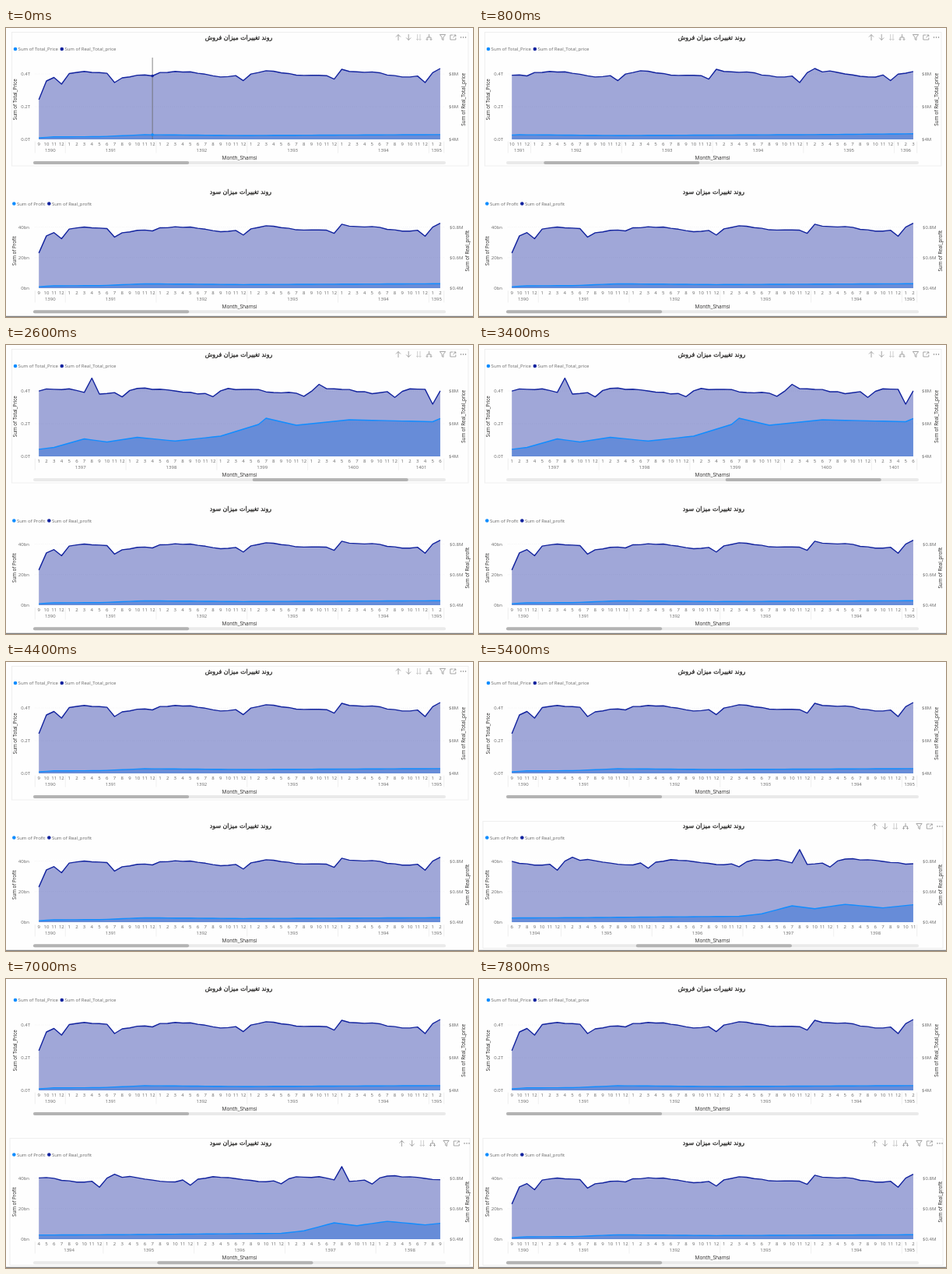
An HTML page for the animation above (8000 ms loop, 600 by 371 pixels).

```html
<!DOCTYPE html>
<html lang="en">
<head>
<meta charset="utf-8">
<title>Scrolling trend charts</title>
<style>
  html, body { margin: 0; width: 100%; height: 100%; overflow: hidden; background: #fefefe; }
  svg { display: block; width: 100%; height: 100%; }
  text { font: 6px "Open Sans", "Noto Sans", sans-serif; fill: #666; }
  .dark { fill: #252423; font-size: 6.2px; }
  .name { font-size: 6.5px; }
  .title { font: 7.9px "DejaVu Sans", sans-serif; fill: #252423; stroke: #252423; stroke-width: .3; direction: rtl; }
  .mid { text-anchor: middle; }
  .end { text-anchor: end; }
  .icon { fill: none; stroke: #909090; stroke-width: .8; }
</style>
</head>
<body>
<svg id="stage" viewBox="0 0 600 371"></svg>
<script>
const LOOP = 8000, VISIBLE = 54, TOTAL = 143, LEFT = 42.2, RIGHT = 557.9;
const STEP = (RIGHT - LEFT) / (VISIBLE - 1);
const TRACK = { x: 35, w: 530 };
const NAVY = '#12239e', BLUE = '#118dff';

// Month 0 is 1390/9.
const monthOf = i => (i + 8) % 12 + 1;
const yearOf = i => 1390 + Math.floor((i + 8) / 12);

// Linear interpolation through [position, value] pairs.
function along(keys, p) {
  const i = keys.findIndex(k => k[0] >= p);
  if (i < 0) return keys[keys.length - 1][1];
  if (i === 0) return keys[0][1];
  const [a, u] = keys[i - 1], [b, v] = keys[i];
  return u + (v - u) * (p - a) / (b - a);
}

function noise(i) {
  const s = Math.sin(i * 12.9898) * 43758.5453;
  return (s - Math.floor(s)) * 2 - 1;
}

// Heights above the base line: a yearly wave that dips in month 12, with a few outliers.
const outliers = { 0: 51, 1: 75, 2: 79.5, 3: 71, 10: 73, 11: 79, 15: 81.5, 40: 90, 51: 73,
  53: 91, 83: 100.5, 113: 92.5, 128: 67, 131: 90, 141: 91, 142: 21 };
function realAt(i) {
  if (i in outliers) return outliers[i];
  const m = monthOf(i);
  return 84 + 3 * Math.cos((m - 3.5) * Math.PI / 6) - (m === 12 ? 6.5 : 0) + 1.3 * noise(i);
}
const priceKeys = [[0, 2], [2, 3.2], [8, 3.5], [14, 6], [27, 5], [54, 6.2], [75, 8],
  [78, 11.5], [82, 22.5], [85, 18.5], [89, 24.5], [94, 19.7], [100, 26], [105, 41], [106, 49],
  [110, 40], [117, 47], [128, 44.5], [135, 74], [137, 91], [138, 85.5], [141, 85.5], [142, 52]];

const indices = Array.from({ length: TOTAL }, (_, i) => i);
const real = indices.map(realAt);
const price = indices.map(i => along(priceKeys, i));

// First visible month over time.
const scrollTop = [[450, 0], [1000, 20], [1300, 20], [1600, 36], [2600, 76],
  [3000, 89], [3250, 89], [4250, 0]];
const scrollLow = [[4900, 0], [5900, 89], [6100, 89], [7000, 43], [7780, 0]];
const SWAP = 4600, CROSS_END = 300;

// Profit is close to a tenth of the price; its share grows slightly over the years.
const share = i => .98 + .017 * Math.min(1, i / 90);

const charts = [
  {
    base: 143, unit: 42, scroll: scrollTop,
    title: 'روند تغییرات میزان فروش', titleX: 299, titleY: 15.2,
    legend: [[12, 'Sum of Total_Price'], [71.8, 'Sum of Real_Total_price']], legendY: 27,
    left: ['0.0T', '0.2T', '0.4T'], leftX: 31, right: ['$4M', '$6M', '$8M'], rightX: 569,
    names: [[14.5, 'Sum of Total_Price'], [590, 'Sum of Real_Total_price']],
    monthY: 150.7, yearY: 158.6, nameY: 169.2, barY: 171,
    frame: [7.5, 5.5, 586.5, 171.5], icons: [504, 12],
    realH: u => u, priceH: u => u
  },
  {
    base: 334, unit: 39.25, scroll: scrollLow,
    title: 'روند تغییرات میزان سود', titleX: 301.5, titleY: 213,
    legend: [[10.3, 'Sum of Profit'], [55.3, 'Sum of Real_profit']], legendY: 225.5,
    left: ['0bn', '20bn', '40bn'], leftX: 30, right: ['$0.4M', '$0.6M', '$0.8M'], rightX: 570,
    names: [[13, 'Sum of Profit'], [595, 'Sum of Real_profit']],
    monthY: 342.2, yearY: 350.4, nameY: 360.2, barY: 362.3,
    frame: [5, 204.5, 591, 163], icons: [508.5, 211],
    realH: (u, i) => ((4 + u / 21) * share(i) - 4) * 78.5 / 4, priceH: u => u * 78.5 / 84
  }
];

const svg = document.getElementById('stage');

function add(parent, tag, attrs, text) {
  const el = document.createElementNS('http://www.w3.org/2000/svg', tag);
  for (const k in attrs) el.setAttribute(k, attrs[k]);
  if (text !== undefined) el.textContent = text;
  return parent.appendChild(el);
}
const write = (parent, x, y, text, cls = '', more = {}) =>
  add(parent, 'text', { x, y, class: cls, ...more }, text);
const show = (el, on) => el.setAttribute('visibility', on ? 'visible' : 'hidden');

function drawIcons(parent, [x, y]) {
  const g = add(parent, 'g', { class: 'icon', transform: `translate(${x} ${y})` });
  const path = (dx, d, more) => add(g, 'path', { d, transform: `translate(${dx} 0)`, ...more });
  path(0, 'M0 4V-3.5M-3 -.5L0 -3.5L3 -.5');
  path(13.2, 'M0 -4V3.5M-3 .5L0 3.5L3 .5');
  path(26.3, 'M-1.7 -4V3.5M-3.2 2L-1.7 3.5L-.2 2M1.7 -4V3.5M.2 2L1.7 3.5L3.2 2', { opacity: .5 });
  path(39.5, 'M0 -4V0M-2.5 3.5V0H2.5V3.5M-3.8 2.2L-2.5 3.5L-1.2 2.2M1.2 2.2L2.5 3.5L3.8 2.2');
  path(57, 'M-3.6 -3.5H3.6L.9 0V3.5L-.9 2.5V0Z');
  path(70.3, 'M0 -3H-3.5V3H3.5V.5M1 -3H3.5V-1M3.5 -3L0 .3');
  for (const dx of [-3, 0, 3])
    add(g, 'circle', { cx: 83.5 + dx, cy: 0, r: .75, fill: '#777', stroke: 'none' });
}

function build(c) {
  const g = add(svg, 'g', {});
  c.hover = add(g, 'g', {});
  const [x, y, width, height] = c.frame;
  add(c.hover, 'rect', { x, y, width, height, fill: 'none', stroke: '#ececec', 'stroke-width': .8 });
  drawIcons(c.hover, c.icons);

  write(g, c.titleX, c.titleY, c.title, 'title mid');
  c.legend.forEach(([lx, label], i) => {
    add(g, 'circle', { cx: lx, cy: c.legendY, r: 2.3, fill: i ? NAVY : BLUE });
    write(g, lx + 3.6, c.legendY + 2.2, label);
  });
  for (let i = 0; i < 3; i++) {
    const ty = c.base - i * c.unit;
    if (i) add(g, 'path', { d: `M37 ${ty}H563`, stroke: '#dcdcdc', 'stroke-width': .5, 'stroke-dasharray': '.6 2' });
    write(g, c.leftX, ty + 2, c.left[i], 'end');
    write(g, c.rightX, ty + 2, c.right[i]);
  }
  const midY = c.base - 1.22 * c.unit;
  for (const [nx, label] of c.names)
    write(g, nx, midY, label, 'dark mid', { transform: `rotate(-90 ${nx} ${midY})` });
  write(g, 300, c.nameY, 'Month_Shamsi', 'dark name mid');

  const area = fill => add(g, 'path', { fill, 'fill-opacity': .4 });
  const line = stroke => add(g, 'path', { fill: 'none', stroke, 'stroke-width': 1.4, 'stroke-linejoin': 'round' });
  c.areas = [area(BLUE), area(NAVY)];
  c.lines = [line(BLUE), line(NAVY)];
  c.splits = add(g, 'path', { stroke: '#e6e6e6', 'stroke-width': .6 });
  c.months = Array.from({ length: VISIBLE }, (_, i) =>
    write(g, LEFT + i * STEP, c.monthY, '', 'mid'));
  c.years = Array.from({ length: 6 }, () => write(g, 0, c.yearY, '', 'mid'));

  const bar = { y: c.barY, height: 4, rx: 2 };
  add(g, 'rect', { x: TRACK.x, width: TRACK.w, fill: '#eaeaea', ...bar });
  c.thumb = add(g, 'rect', { width: TRACK.w * VISIBLE / TOTAL, fill: '#b3b3b3', ...bar });
}

function update(c, start) {
  if (c.start === start) return;
  c.start = start;
  [[price, c.priceH], [real, c.realH]].forEach(([data, toH], k) => {
    const pts = data.slice(start, start + VISIBLE).map((u, i) =>
      `${(LEFT + i * STEP).toFixed(2)} ${(c.base - toH(u, start + i)).toFixed(2)}`).join('L');
    c.lines[k].setAttribute('d', 'M' + pts);
    c.areas[k].setAttribute('d', `M${LEFT} ${c.base}L${pts}L${RIGHT} ${c.base}Z`);
  });

  const groups = new Map();
  c.months.forEach((el, i) => {
    const year = yearOf(start + i);
    el.textContent = monthOf(start + i);
    if (!groups.has(year)) groups.set(year, [i, i]);
    groups.get(year)[1] = i;
  });
  const list = [...groups];
  const split = i => `M${LEFT + (i - .5) * STEP} ${c.monthY - 5}V${c.yearY + 2}`;
  c.splits.setAttribute('d', list.map(([, [first]]) => split(first)).join('') + split(VISIBLE));
  c.years.forEach((el, i) => {
    if (!list[i]) return el.textContent = '';
    const [year, [first, last]] = list[i];
    el.textContent = year;
    el.setAttribute('x', LEFT + (first + last) / 2 * STEP);
  });
  c.thumb.setAttribute('x', TRACK.x + TRACK.w * start / TOTAL);
}

charts.forEach(build);
add(svg, 'path', { d: 'M0 370.3H600', stroke: '#4a4a4a', 'stroke-width': .9 });

// Hover line on month 12 of 1391.
const cross = add(svg, 'g', {}), crossX = LEFT + 15 * STEP;
add(cross, 'path', { d: `M${crossX} 38V143`, stroke: '#666', 'stroke-width': .8 });
add(cross, 'circle', { cx: crossX, cy: 143 - real[15], r: 1.8, fill: NAVY });
add(cross, 'circle', { cx: crossX, cy: 143 - price[15], r: 1.8, fill: BLUE });

function render(t) {
  for (const c of charts) update(c, Math.round(along(c.scroll, t)));
  show(charts[0].hover, t < SWAP);
  show(charts[1].hover, t >= SWAP);
  show(cross, t < CROSS_END);
}

const begin = performance.now();
function tick() {
  render((performance.now() - begin) % LOOP);
  requestAnimationFrame(tick);
}
tick();
</script>
</body>
</html>
```
